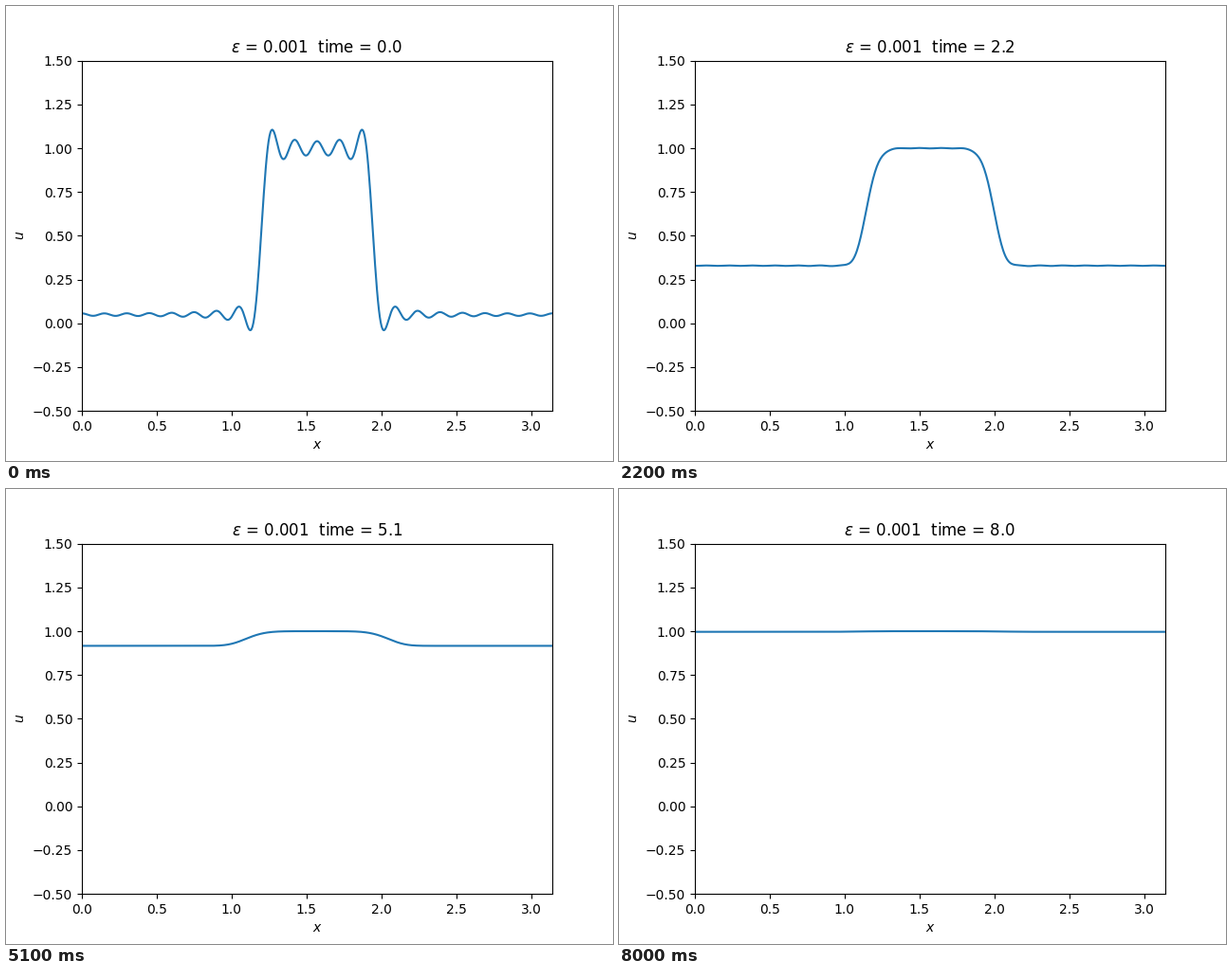
These frames come from a looping animation (640x480 px, 8100 ms). A matplotlib script:

```python
import numpy as np
import matplotlib.pyplot as plt
from matplotlib.animation import FuncAnimation

# Reaction-diffusion u_t = eps u_xx + u (1 - u) on [0, pi] with zero-flux ends,
# cosine Galerkin in space, exponential Euler in time.
EPS = 0.001
DT = 0.1
FRAMES = 81
MODES = 40
NODES = 2 * MODES

k = np.arange(MODES + 1)
nodes = np.linspace(0, np.pi, NODES + 1)
basis = np.cos(np.outer(k, nodes))

weights = np.full(NODES + 1, 2 / NODES)
weights[[0, -1]] /= 2


def to_modes(values):
    coeffs = basis @ (weights * values)
    coeffs[0] /= 2
    return coeffs


def solve():
    linear = 1 - EPS * k**2
    decay = np.exp(linear * DT)
    gain = (decay - 1) / linear
    coeffs = to_modes(np.where(abs(nodes - np.pi / 2) < 0.375, 1.0, 0.05))
    history = [coeffs]
    for _ in range(FRAMES - 1):
        coeffs = decay * coeffs - gain * to_modes((coeffs @ basis) ** 2)
        history.append(coeffs)
    return np.array(history)


x = np.linspace(0, np.pi, 500)
u = solve() @ np.cos(np.outer(k, x))

fig, ax = plt.subplots(figsize=(6.4, 4.8), dpi=100)
line, = ax.plot(x, u[0])
ax.set_xlim(0, np.pi)
ax.set_ylim(-0.5, 1.5)
ax.set_xlabel("$x$")
ax.set_ylabel("$u$")
title = ax.set_title("")


def update(i):
    line.set_ydata(u[i])
    title.set_text(f"$ε$ = {EPS}  time = {i * DT:.1f}")
    return line, title


anim = FuncAnimation(fig, update, frames=FRAMES, interval=100,
                     repeat=True, repeat_delay=0)
plt.show()
```
